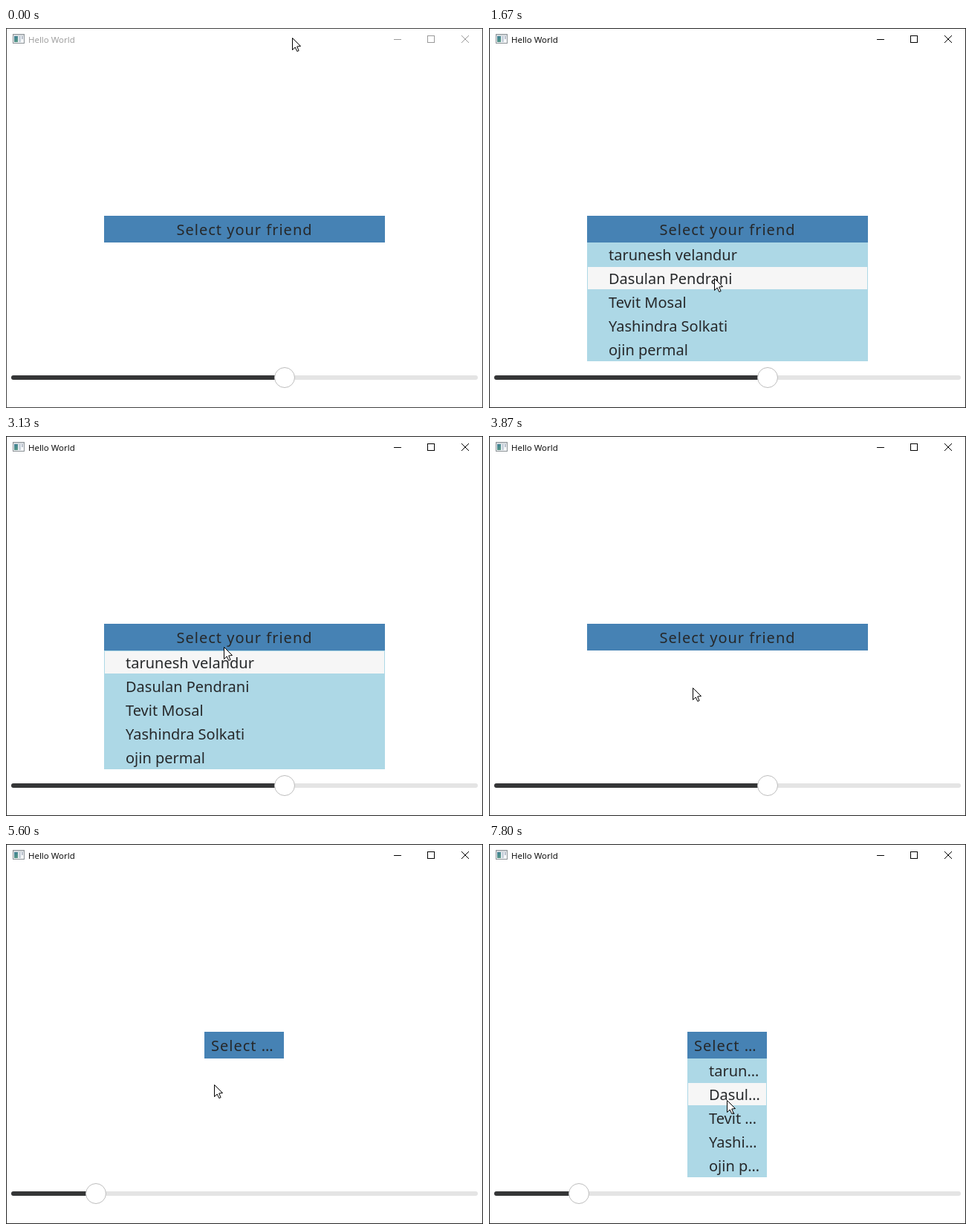
Write an HTML page with a canvas that moves like this. It is 642 px wide and 512 px high and loops after 8000 ms.

```html
<!DOCTYPE html>
<html lang="en">
<head>
<meta charset="utf-8">
<title>Hello World</title>
<style>
  html, body { margin: 0; width: 100%; height: 100%; overflow: hidden; background: #fff; }
  canvas { display: block; }
</style>
</head>
<body>
<canvas id="stage" width="642" height="512"></canvas>
<script>
const ctx = document.getElementById('stage').getContext('2d');
const LOOP = 8000;
const TICK = 1000 / 15;
const ROW = 32;
const COMBO = { y: 253, h: 36 };
const TEXT = '#26282a';
const LABEL = 'Select your friend';
const FRIENDS = ['tarunesh velandur', 'Dasulan Pendrani', 'Tevit Mosal', 'Yashindra Solkati', 'ojin permal'];

// Pointer stops: time, x, y
const STOPS = [
  [67, 385, 13], [667, 314, 306], [933, 342, 267], [1200, 342, 267],
  [1867, 292, 356], [2000, 292, 356], [2133, 289, 357], [2200, 289, 357],
  [2867, 300, 265], [2933, 300, 265], [3533, 274, 339], [3867, 274, 339],
  [4267, 375, 477], [4533, 375, 477], [5067, 121, 491], [5333, 121, 491],
  [5600, 280, 324], [6133, 326, 267], [6200, 326, 270],
  [6467, 329, 350], [6733, 325, 365], [6867, 325, 365],
  [7333, 328, 268], [7467, 328, 268], [7800, 320, 345]
];
const OPEN_SPANS = [[1267, 2067], [3000, 3800], [6200, 6867], [7533, LOOP]];
const FOCUS_AT = 1200;
const DRAG = { start: 4533, end: 5067, from: 375, to: 121 };

function pointerAt(t) {
  const next = STOPS.findIndex(stop => stop[0] > t);
  if (next === 0) return { x: STOPS[0][1], y: STOPS[0][2] };
  const [t0, x0, y0] = STOPS[(next < 0 ? STOPS.length : next) - 1];
  if (next < 0) return { x: x0, y: y0 };
  const [t1, x1, y1] = STOPS[next];
  const u = (t - t0) / (t1 - t0);
  const k = u * u * (3 - 2 * u);
  return { x: Math.round(x0 + (x1 - x0) * k), y: Math.round(y0 + (y1 - y0) * k) };
}

function sliderAt(t, pointer) {
  if (t < DRAG.start) return DRAG.from;
  return t >= DRAG.end ? DRAG.to : pointer.x;
}

function rect(x, y, w, h, color) {
  ctx.fillStyle = color;
  ctx.fillRect(x, y, w, h);
}

function pill(x, y, w, h, color) {
  ctx.fillStyle = color;
  ctx.beginPath();
  ctx.roundRect(x, y, w, h, h / 2);
  ctx.fill();
}

function setText(size, family, spacing, color) {
  ctx.font = `${size}px "${family}", sans-serif`;
  ctx.letterSpacing = spacing + 'px';
  ctx.fillStyle = color;
}

function elide(text, room) {
  if (ctx.measureText(text).width <= room) return text;
  let n = text.length - 1;
  while (n > 0 && ctx.measureText(text.slice(0, n) + '…').width > room) n--;
  return text.slice(0, n) + '…';
}

function drawWindow(active) {
  rect(0, 0, 642, 512, active ? '#262626' : '#434343');
  rect(1, 1, 640, 510, '#fff');

  rect(9, 8, 16, 13, '#8c9296');
  rect(10, 9, 14, 2, '#d5dade');
  rect(10, 11, 14, 9, '#f4f6f8');
  const pane = ctx.createLinearGradient(11, 11, 16, 19);
  pane.addColorStop(0, '#3f7f98');
  pane.addColorStop(1, '#5a9a82');
  rect(11, 11, 5, 8, pane);
  rect(17, 11, 3, 8, '#c8d2dc');
  rect(21, 11, 2, 4, '#b7bfcb');

  const ink = active ? '#000' : '#999';
  setText(11.5, 'Open Sans', 0, ink);
  ctx.fillText('Hello World', 30, 20);

  rect(522, 15, 10, 1, ink);
  ctx.strokeStyle = ink;
  ctx.lineWidth = 1;
  ctx.strokeRect(567.5, 10.5, 9, 9);
  ctx.beginPath();
  ctx.moveTo(613, 10); ctx.lineTo(623, 20);
  ctx.moveTo(623, 10); ctx.lineTo(613, 20);
  ctx.stroke();
}

function drawSlider(x, pressed) {
  pill(7, 468, 628, 6, '#e4e4e4');
  pill(7, 468, x - 7, 6, '#353637');
  ctx.beginPath();
  ctx.arc(x, 471, 13.5, 0, Math.PI * 2);
  ctx.fillStyle = pressed ? '#f6f6f6' : '#fff';
  ctx.fill();
  ctx.strokeStyle = '#bdbdbd';
  ctx.lineWidth = 1;
  ctx.stroke();
}

function drawCombo(sliderX, open, pointer) {
  const w = Math.round(640 * (sliderX - 21) / 600);
  const x = Math.floor(1 + (640 - w) / 2);
  const bottom = COMBO.y + COMBO.h;

  rect(x, COMBO.y, w, COMBO.h, '#4682b4');
  setText(20, 'Noto Sans', 1, TEXT);
  const label = elide(LABEL, w - 18);
  const indent = label === LABEL ? (w - ctx.measureText(label).width) / 2 : 9;
  ctx.fillText(label, x + indent, 279);
  if (!open) return;

  rect(x, bottom, w, ROW * FRIENDS.length, '#add8e6');
  const hovered = Math.max(0, Math.min(FRIENDS.length - 1, Math.floor((pointer.y - bottom) / ROW)));
  rect(x + 1, bottom + hovered * ROW + 1, w - 2, ROW - 2, '#f6f6f6');
  setText(20, 'Noto Sans', 0, TEXT);
  FRIENDS.forEach((name, i) => {
    ctx.fillText(elide(name, w - 36), x + 29, bottom + i * ROW + 24);
  });
}

function drawPointer({ x, y }) {
  ctx.save();
  ctx.translate(x + 0.5, y + 0.5);
  ctx.beginPath();
  ctx.moveTo(0, 0);
  [[0, 16], [3.7, 12.5], [6.3, 18], [8.6, 17], [6.2, 11.5], [11, 11]].forEach(p => ctx.lineTo(...p));
  ctx.closePath();
  ctx.fillStyle = '#fff';
  ctx.fill();
  ctx.strokeStyle = '#000';
  ctx.lineWidth = 1;
  ctx.stroke();
  ctx.restore();
}

function draw(elapsed) {
  const t = Math.round(Math.floor((elapsed % LOOP + 4) / TICK) * TICK);
  const pointer = pointerAt(t);
  const sliderX = sliderAt(t, pointer);
  const open = OPEN_SPANS.some(([from, to]) => t >= from && t < to);
  drawWindow(t >= FOCUS_AT);
  drawCombo(sliderX, open, pointer);
  drawSlider(sliderX, t >= DRAG.start && t < DRAG.end);
  drawPointer(pointer);
}

const start = performance.now();
function frame() {
  draw(performance.now() - start);
  requestAnimationFrame(frame);
}
frame();
</script>
</body>
</html>
```
